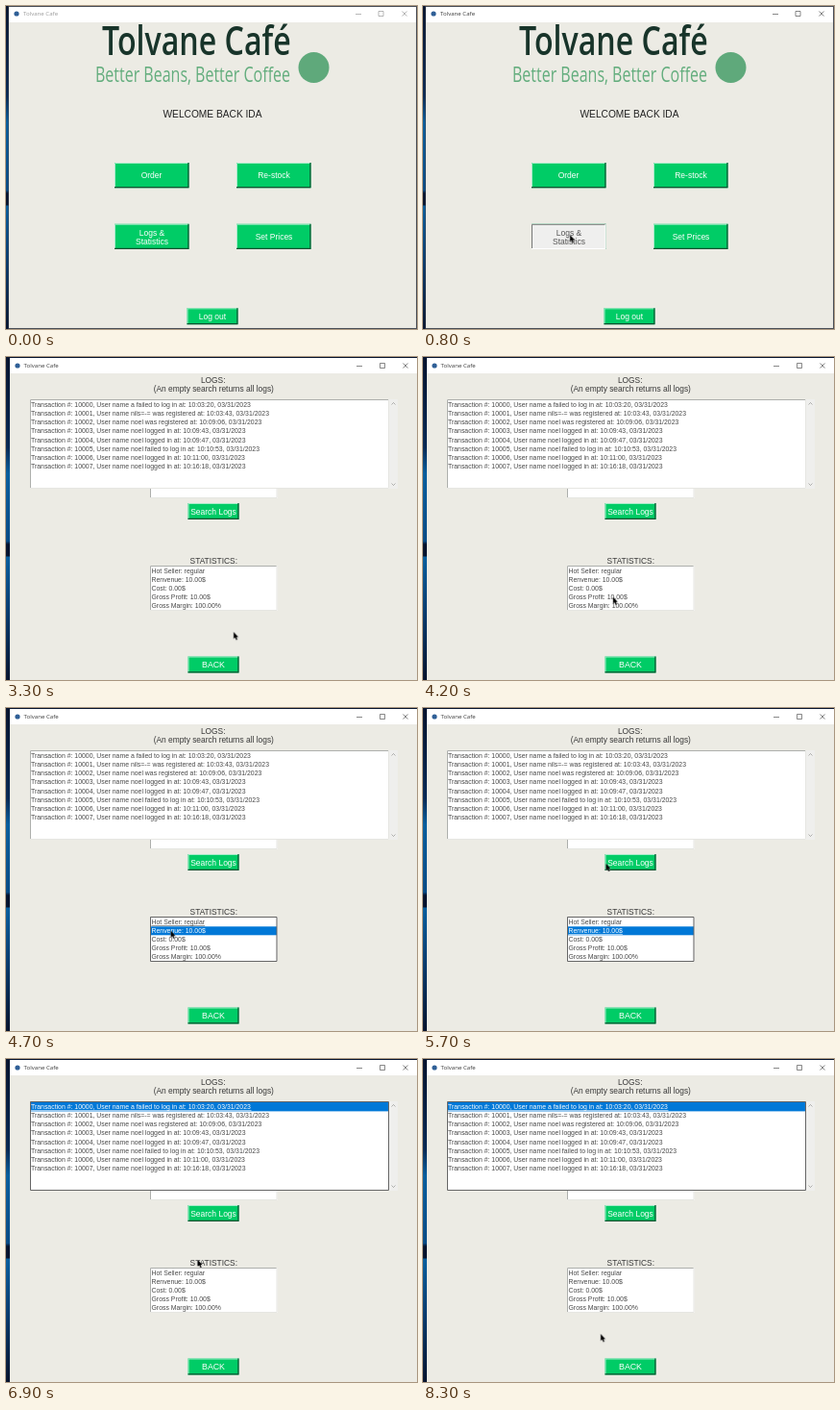
Animation, 428 px wide and 336 px high, one loop 8400 ms. Source, as an HTML page:

```html
<!DOCTYPE html>
<html lang="en">
<head>
<meta charset="utf-8">
<title>Tolvane Cafe</title>
<style>
  html, body { margin: 0; width: 100%; height: 100%; overflow: hidden; background: #ecebe4; }
  svg { display: block; width: 428px; height: 336px; }
  text { font: 8.4px "Liberation Sans", Arial, sans-serif; fill: #383838; }
  .mid text { text-anchor: middle; }
  .btn text { fill: #fff; font-size: 8.5px; }
  .btn .dark { fill: #555; }
  .list text, .on text { font-size: 6.9px; }
  .list text { fill: #484848; }
  .on text { fill: #fff; }
  .on rect { fill: #0078d7; }
  .title { font: 6.1px "Open Sans", "Noto Sans", sans-serif; }
  .idle { fill: #999; }
  .brand { font: 600 42px "Open Sans", "Noto Sans", sans-serif; fill: #18342a; }
  .motto { font: 21px "Open Sans", "Noto Sans", sans-serif; fill: #63ad7d; }
  .mid .welcome { font-size: 10.2px; fill: #222; }
  .line { fill: none; stroke: #555; stroke-width: .7; }
  .light, .shade, .sunk, .rim { fill: none; }
  .light { stroke: #a5ebc8; }
  .shade { stroke: #0d5230; stroke-width: 1.2; }
  .sunk { stroke: #adafac; }
  .rim { stroke: #e6e6e2; }
  .focus { fill: none; stroke: #666; }
  .under { stroke: #555; stroke-width: .6; }
  .on .under { stroke: #fff; }

  /* One loop is 8400 ms */
  .state { animation: 8400ms step-end infinite; }
  .menu { animation-name: menu; }
  .logs { animation-name: logs; }
  .blur { animation-name: blur; }
  .lit { animation-name: lit; }
  .press { animation-name: press; }
  .stat { animation-name: stat; }
  .stat-down { animation-name: stat-down; }
  .stat-up { animation-name: stat-up; }
  .log { animation-name: log; }
  .log-third { animation-name: log-third; }
  .log-first { animation-name: log-first; }
  @keyframes menu { 0% { opacity: 1 } 10.714%, 100% { opacity: 0 } }
  @keyframes logs { 0% { opacity: 0 } 10.714%, 100% { opacity: 1 } }
  @keyframes blur { 0% { opacity: 1 } 8.333%, 100% { opacity: 0 } }
  @keyframes lit { 0% { opacity: 0 } 8.333%, 100% { opacity: 1 } }
  @keyframes press { 0% { opacity: 0 } 8.333%, 100% { opacity: 1 } }
  @keyframes stat { 0% { opacity: 0 } 55.952% { opacity: 1 } 72.619%, 100% { opacity: 0 } }
  @keyframes stat-down { 0% { opacity: 1 } 57.142%, 100% { opacity: 0 } }
  @keyframes stat-up { 0% { opacity: 0 } 57.142%, 100% { opacity: 1 } }
  @keyframes log { 0% { opacity: 0 } 72.619%, 100% { opacity: 1 } }
  @keyframes log-third { 0% { opacity: 1 } 75%, 100% { opacity: 0 } }
  @keyframes log-first { 0% { opacity: 0 } 75%, 100% { opacity: 1 } }

  .cursor { fill: #000; stroke: #fff; stroke-width: .5; paint-order: stroke; animation: move 8400ms ease-in-out infinite; }
  @keyframes move {
    0%, 1.19% { transform: translate(192px, 340px) }
    7.143%, 11.905% { transform: translate(153px, 238px) }
    22.619%, 23.81% { transform: translate(242px, 193px) }
    32.143% { transform: translate(236px, 163px) }
    34.524% { transform: translate(209px, 240px) }
    36.905%, 38.095% { transform: translate(240px, 296px) }
    39.286%, 40.476% { transform: translate(237px, 286px) }
    41.667%, 44.048% { transform: translate(237px, 276px) }
    54.762%, 58.333% { transform: translate(171.5px, 231.5px) }
    65.476% { transform: translate(190px, 190px) }
    72.619%, 73.81% { transform: translate(192px, 69px) }
    75%, 76.19% { transform: translate(190px, 50px) }
    86.905% { transform: translate(206px, 316px) }
    88.095%, 89.286% { transform: translate(226px, 316px) }
    91.667% { transform: translate(236px, 317px) }
    96.429%, 100% { transform: translate(185px, 286px) }
  }
</style>
</head>
<body>
<svg viewBox="0 0 428 336">
  <defs>
    <linearGradient id="desk" x2="0" y2="1">
      <stop offset="0" stop-color="#07142e"/>
      <stop offset=".28" stop-color="#0a2a55"/>
      <stop offset=".36" stop-color="#0b5f9e"/>
      <stop offset=".57" stop-color="#0a4c86"/>
      <stop offset=".58" stop-color="#07142e"/>
      <stop offset=".615" stop-color="#07142e"/>
      <stop offset=".62" stop-color="#0b5f9e"/>
      <stop offset=".8" stop-color="#0a3a6c"/>
      <stop offset="1" stop-color="#07142e"/>
    </linearGradient>
    <g id="big">
      <path d="M0 0H77.5V26.3H0Z" fill="#00cc66"/>
      <path class="light" d="M.5 26V.5H77"/>
      <path class="shade" d="M0 25.7H76.9V0"/>
    </g>
    <g id="small">
      <path d="M0 0H53V17H0Z" fill="#00cc66"/>
      <path class="light" d="M.5 17V.5H53"/>
      <path class="shade" d="M0 16.4H52.4V0"/>
    </g>
  </defs>

  <rect width="428" height="336" fill="url(#desk)"/>

  <g class="state menu">
    <rect x="2.5" width="425.5" height="336" fill="#4a4f58"/>
    <rect x="3" y="1" width="424" height="334" fill="#ecebe4"/>
    <rect x="3" y="1" width="424" height="16" fill="#fff"/>
    <circle cx="11" cy="8" r="2.6" fill="#2f5f96"/>
    <g class="state blur">
      <text class="title idle" x="18" y="10.3">Tolvane Cafe</text>
      <path class="line" stroke-opacity=".6" d="M364 8.5h6M388 5.5h5v5h-5zM412.5 5.5l5 5m0-5l-5 5"/>
    </g>
    <g class="state lit">
      <text class="title" x="18" y="10.3">Tolvane Cafe</text>
      <path class="line" d="M364 8.5h6M388 5.5h5v5h-5zM412.5 5.5l5 5m0-5l-5 5"/>
    </g>

    <!-- narrow lettering -->
    <text class="brand" transform="translate(100 51) scale(.765 1)">Tolvane Café</text>
    <text class="motto" transform="translate(93 79) scale(.763 1)">Better Beans, Better Coffee</text>
    <circle cx="320.5" cy="64" r="16" fill="#5fa97b"/>

    <g class="mid"><text class="welcome" x="215" y="116">WELCOME BACK IDA</text></g>
    <g class="mid btn">
      <use href="#big" x="113" y="163"/>
      <text x="151.5" y="179">Order</text>
      <use href="#big" x="240" y="163"/>
      <text x="279" y="179">Re-stock</text>
      <use href="#big" x="113" y="226.7"/>
      <text x="152" y="238.5">Logs &amp;</text>
      <text x="152" y="247.5">Statistics</text>
      <use href="#big" x="240" y="226.7"/>
      <text x="279" y="243">Set Prices</text>
      <use href="#small" x="188.5" y="314.3"/>
      <text x="215" y="326">Log out</text>
      <g class="state press">
        <path d="M113 226.7h77.5V253H113z" fill="#efefee"/>
        <path d="M113.5 253V227.3H190" fill="none" stroke="#777"/>
        <path d="M113 252.5h77V227" fill="none" stroke="#fff"/>
        <text class="dark" x="152" y="238.5">Logs &amp;</text>
        <text class="dark" x="152" y="247.5">Statistics</text>
      </g>
    </g>
  </g>

  <g class="state logs">
    <rect x="4" y="1" width="424" height="335" fill="#ecebe4"/>
    <rect x="4" y="1" width="424" height="16" fill="#fff"/>
    <circle cx="12" cy="9" r="2.6" fill="#2f5f96"/>
    <text class="title" x="18.6" y="11.3">Tolvane Cafe</text>
    <path class="line" d="M365 9.5h6M389.5 6.5h5v5h-5zM413.5 6.5l5 5m0-5l-5 5"/>

    <g class="mid">
      <text x="215.7" y="26.5">LOGS:</text>
      <text x="216.3" y="36.3">(An empty search returns all logs)</text>
      <text x="216.3" y="214.8">STATISTICS:</text>
    </g>

    <path d="M150 137h132.5v10H150z" fill="#fff"/>
    <path class="sunk" d="M150.5 147V137"/>
    <path class="rim" d="M150 146.5h132V137"/>

    <path d="M25 44h374v93H25z" fill="#fff"/>
    <path class="sunk" d="M25.5 137V44.5H399"/>
    <path class="rim" d="M25 136.5h373.5V44"/>
    <path d="M399 44h9v93h-9z" fill="#efefed"/>
    <path class="line" stroke-opacity=".6" d="M401.5 49.5l2-2 2 2M401.5 131.5l2 2 2-2"/>
    <g class="list">
      <text x="26" y="52.3">Transaction #: 10000, User name a failed to log in at: 10:03:20, 03/31/2023</text>
      <text x="26" y="61.3">Transaction #: 10001, User name nils=-= was registered at: 10:03:43, 03/31/2023</text>
      <text x="26" y="70.4">Transaction #: 10002, User name noel was registered at: 10:09:06, 03/31/2023</text>
      <text x="26" y="79.4">Transaction #: 10003, User name noel logged in at: 10:09:43, 03/31/2023</text>
      <text x="26" y="88.5">Transaction #: 10004, User name noel logged in at: 10:09:47, 03/31/2023</text>
      <text x="26" y="97.5">Transaction #: 10005, User name noel failed to log in at: 10:10:53, 03/31/2023</text>
      <text x="26" y="106.5">Transaction #: 10006, User name noel logged in at: 10:11:00, 03/31/2023</text>
      <text x="26" y="115.6">Transaction #: 10007, User name noel logged in at: 10:16:18, 03/31/2023</text>
    </g>
    <g class="state log">
      <g class="state log-third">
        <path class="under" d="M26 53.5H255.5"/>
        <g class="on">
          <rect x="26" y="63.6" width="372" height="9"/>
          <text x="26" y="70.4">Transaction #: 10002, User name noel was registered at: 10:09:06, 03/31/2023</text>
        </g>
      </g>
      <g class="state log-first on">
        <rect x="26" y="45" width="372" height="9.4"/>
        <text x="26" y="52.3">Transaction #: 10000, User name a failed to log in at: 10:03:20, 03/31/2023</text>
        <path class="under" d="M26 53.5H255.5"/>
      </g>
      <path class="focus" d="M25.5 44.5h373v92h-373z"/>
    </g>

    <path d="M150 217h132.5v47H150z" fill="#fff"/>
    <path class="sunk" d="M150.5 264V217.5H282"/>
    <path class="rim" d="M150 263.5h132V217"/>
    <g class="list">
      <text x="151.5" y="225.2">Hot Seller: regular</text>
      <text x="151.5" y="234.2">Renvenue: 10.00$</text>
      <text x="151.5" y="243.2">Cost: 0.00$</text>
      <text x="151.5" y="252.2">Gross Profit: 10.00$</text>
      <text x="151.5" y="261.2">Gross Margin: 100.00%</text>
    </g>
    <g class="state stat">
      <path class="under state stat-down" d="M151.5 226.5h55.6"/>
      <g class="on">
        <rect x="151" y="227.3" width="131" height="9"/>
        <text x="151.5" y="234.2">Renvenue: 10.00$</text>
        <path class="under state stat-up" d="M151.5 235.5h56.4"/>
      </g>
      <path class="focus" d="M150.5 217.5H282v46H150.5z"/>
    </g>

    <g class="mid btn">
      <use href="#small" x="189.5" y="152"/>
      <text x="216" y="163.7">Search Logs</text>
      <use href="#small" x="189.5" y="311.5"/>
      <text x="216" y="323.2" style="font-size:8.8px">BACK</text>
    </g>
  </g>

  <g class="cursor"><path transform="scale(.8)" d="M0 0V9L2 7.2 3.5 10.5 5 9.8 3.6 6.7H6.3Z"/></g>
</svg>
</body>
</html>
```
